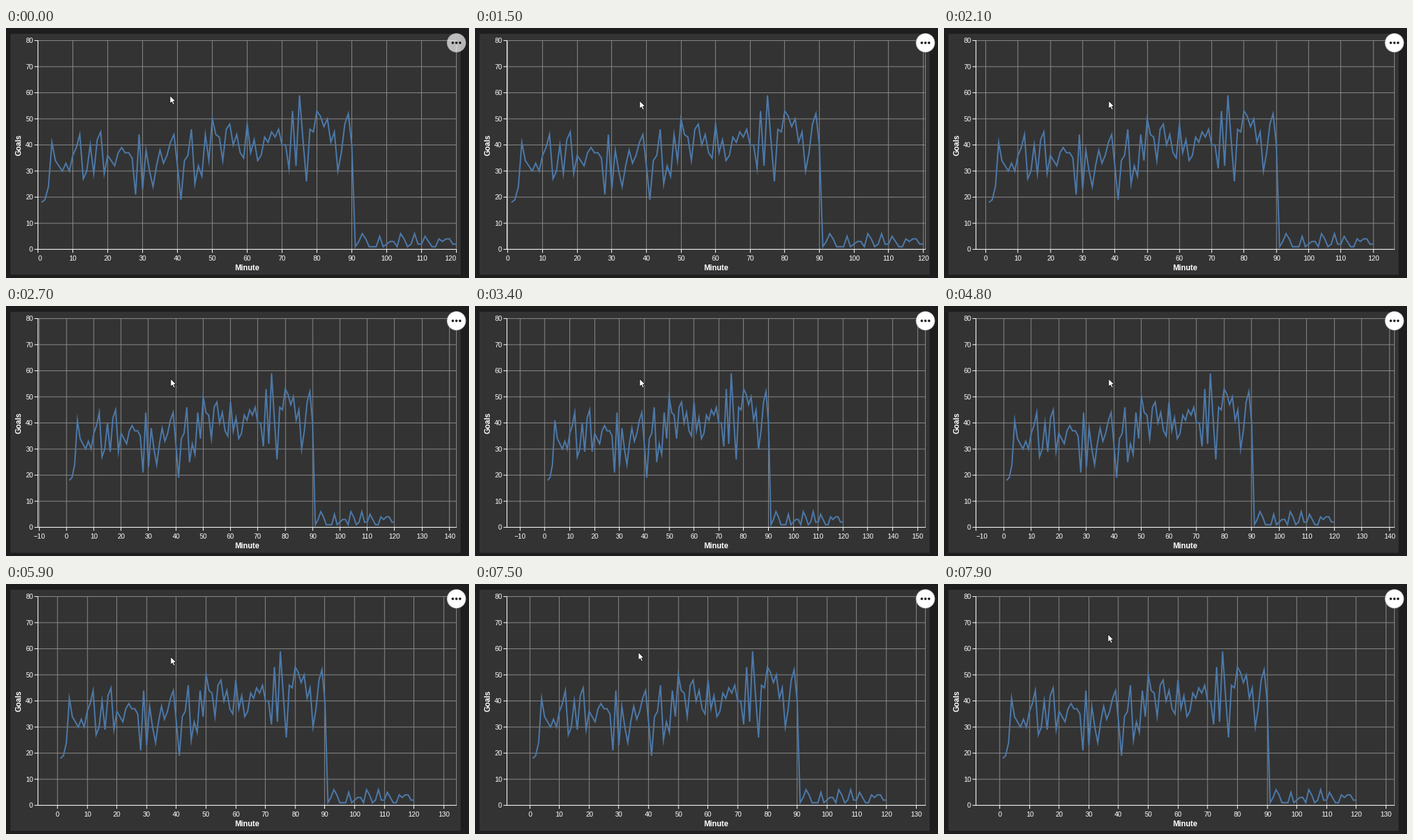
Animation, 717 px wide and 388 px high, one loop 8 s. Source, as a matplotlib script:

```python
import numpy as np
import matplotlib
import matplotlib.pyplot as plt
from matplotlib.animation import FuncAnimation
from matplotlib.collections import LineCollection, PolyCollection
from matplotlib.patches import Circle, Polygon, Rectangle

matplotlib.rcParams["toolbar"] = "None"
matplotlib.rcParams["font.family"] = "Liberation Sans"

W, H, DPI = 717, 388, 64
PT = 72 / DPI              # points per pixel
UNIT = 1.08                # screen pixels per chart pixel
LEFT, RIGHT, TOP, BOTTOM = 49.5, 697.5, 19.5, 343.5
FRAMES, STEP_MS = 80, 100

WHITE, GRID, BLUE = "#ffffff", "#888888", "#4c78a8"

GOALS = np.array([
    18, 19, 24, 41, 34, 32, 30, 33, 30, 36, 39, 44, 27, 30, 40,
    29, 42, 45, 29, 36, 34, 32, 37, 39, 37, 37, 35, 21, 44, 23,
    38, 30, 24, 32, 38, 33, 36, 41, 44, 32, 19, 34, 36, 46, 25,
    32, 28, 44, 34, 50, 44, 43, 34, 46, 48, 40, 44, 37, 35, 48,
    37, 42, 34, 36, 43, 41, 45, 43, 46, 40, 40, 31, 53, 32, 59,
    42, 26, 46, 45, 53, 51, 47, 50, 41, 45, 30, 37, 48, 52, 40,
    1, 3, 6, 4, 1, 1, 1, 5, 1, 2, 3, 3, 1, 6, 4,
    1, 2, 6, 2, 2, 5, 3, 1, 1, 4, 3, 4, 4, 2, 2])
MINUTES = np.arange(1, len(GOALS) + 1)
TICKS = np.arange(-10, 160, 10)

# Zooming keeps this minute fixed under the pointer.
ANCHOR_X, ANCHOR_MINUTE = 254.0, 37.87
ZOOM_KEYS = np.array([
    (14, 5.4), (18, 5.23), (21, 5.0), (23, 4.84), (24, 4.7), (27, 4.235),
    (31, 3.97), (32, 3.866), (34, 3.846), (38, 3.846), (41, 3.93),
    (45, 4.2), (47, 4.267), (50, 4.267), (51, 4.36), (53, 4.43),
    (55, 4.43), (56, 4.48), (59, 4.602)])
DRAG_KEYS = [74, 75, 76, 77, 78, 79]
DRAG_PAN = [0, 5, 13, 16.5, 12, 6.5]
DRAG_X = [255, 253, 260, 264, 259, 254]


def to_y(goals):
    return BOTTOM - goals * (BOTTOM - TOP) / 80


def view(i):
    """Pixels per minute and the pixel of minute zero."""
    scale = np.interp(i, *ZOOM_KEYS.T)
    pan = np.interp(i, DRAG_KEYS, DRAG_PAN)
    return scale, ANCHOR_X - ANCHOR_MINUTE * scale + pan


def pointer(i):
    if i == 0:
        return 254, 105
    return np.interp(i, DRAG_KEYS, DRAG_X), np.interp(i, [74, 79], [113, 78])


def miters(points, half, limit=10):
    """Pointed corners of a stroke, left out where they exceed the limit."""
    d = np.diff(points, axis=0)
    d /= np.hypot(d[:, 0], d[:, 1])[:, None]
    a, b = d[:-1], d[1:]
    turn = np.sign(a[:, 0] * b[:, 1] - a[:, 1] * b[:, 0])[:, None]
    na = np.column_stack([a[:, 1], -a[:, 0]]) * turn
    nb = np.column_stack([b[:, 1], -b[:, 0]]) * turn
    total = na + nb
    size = np.hypot(total[:, 0], total[:, 1])
    keep = (turn[:, 0] != 0) & (size * limit >= 2)
    p, na, nb = points[1:-1][keep], na[keep] * half, nb[keep] * half
    tip = p + 2 * half * total[keep] / size[keep, None] ** 2
    return np.stack([p, p + na, tip, p + nb], axis=1)


fig = plt.figure(figsize=(W / DPI, H / DPI), dpi=DPI, facecolor="#1e1e1e")
ax = fig.add_axes([0, 0, 1, 1])
ax.set_xlim(0, W)
ax.set_ylim(H, 0)
ax.axis("off")


def lines(segments, color, z):
    group = LineCollection(segments, colors=color, linewidths=UNIT * PT,
                           capstyle="butt", zorder=z)
    group.set_snap(False)
    return ax.add_collection(group, autolim=False)


def label(x, y, text, size=10, **kw):
    return ax.text(x, y, text, color=WHITE, fontsize=size * UNIT * PT,
                   va="baseline", zorder=5, **kw)


# Panel and fixed parts of the axes
ax.add_patch(Rectangle((7, 8.5), 697, 374, fc="#333333", ec="none", zorder=0))
levels = np.arange(0, 90, 10)
lines([[(LEFT, to_y(v)), (RIGHT, to_y(v))] for v in levels]
      + [[(x, TOP), (x, BOTTOM)] for x in (LEFT, RIGHT)], GRID, 1)
lines([[(LEFT - 5.4, to_y(v)), (LEFT, to_y(v))] for v in levels]
      + [[(LEFT, TOP - 0.5), (LEFT, BOTTOM + 0.5)],
         [(LEFT - 0.5, BOTTOM), (RIGHT + 0.5, BOTTOM)]], WHITE, 3)
for v in levels:
    label(42, to_y(v) + 3.7, str(v), ha="right")
label((LEFT + RIGHT) / 2, 375.7, "Minute", 11, weight="bold", ha="center")
label(23, 181.5, "Goals", 11, weight="bold", ha="center", rotation=90,
      rotation_mode="anchor")

# Moving parts
x_grid = lines([], GRID, 1)
x_ticks = lines([], WHITE, 3)
x_labels = [label(0, 360.6, str(t).replace("-", "\u2212")) for t in TICKS]
curve, = ax.plot([], [], color=BLUE, lw=2 * UNIT * PT, zorder=4,
                 solid_joinstyle="bevel", solid_capstyle="butt")
tips = ax.add_collection(PolyCollection([], facecolors=BLUE, edgecolors="none",
                                        zorder=4), autolim=False)

button = ax.add_patch(Circle((697.5, 23), 14.5, fc=WHITE, ec="#aaaaaa",
                             lw=0.8 * PT, zorder=6))
for dx in (-5.6, 0, 5.6):
    ax.add_patch(Circle((697.5 + dx, 23), 1.9, fc="#1b1b1b", ec="none",
                        zorder=7))

ARROW = np.array([(0, 0), (0, 12.2), (2.8, 9.6), (4.8, 14), (6.8, 13.1),
                  (4.9, 8.8), (8.6, 8.6)])
cursor = ax.add_patch(Polygon(ARROW, closed=True, fc=WHITE, ec="#111111",
                              lw=0.8 * PT, zorder=8))


def update(i):
    scale, zero = view(i)

    points = np.column_stack([zero + MINUTES * scale, to_y(GOALS)])
    curve.set_data(points[:, 0], points[:, 1])
    tips.set_verts(miters(points, UNIT))

    shown = []
    for tick, text in zip(TICKS, x_labels):
        x = zero + tick * scale
        visible = LEFT - 0.3 <= x <= RIGHT + 0.3
        text.set_visible(visible)
        if not visible:
            continue
        # Labels at the very ends are pushed inside the plot.
        if abs(x - LEFT) < UNIT:
            text.set_ha("left")
        elif abs(x - RIGHT) < UNIT:
            text.set_ha("right")
        else:
            text.set_ha("center")
        x = LEFT + UNIT * round((x - LEFT) / UNIT)
        text.set_x(x)
        shown.append(x)
    x_grid.set_segments([[(x, TOP), (x, BOTTOM)] for x in shown])
    x_ticks.set_segments([[(x, BOTTOM), (x, BOTTOM + 5.4)] for x in shown])

    button.set_alpha(0.68 if i == 0 else 1)
    cursor.set_xy(ARROW + pointer(i))
    return []


anim = FuncAnimation(fig, update, frames=FRAMES, interval=STEP_MS,
                     init_func=lambda: update(0), repeat=True, repeat_delay=0,
                     blit=False)
plt.show()
```
